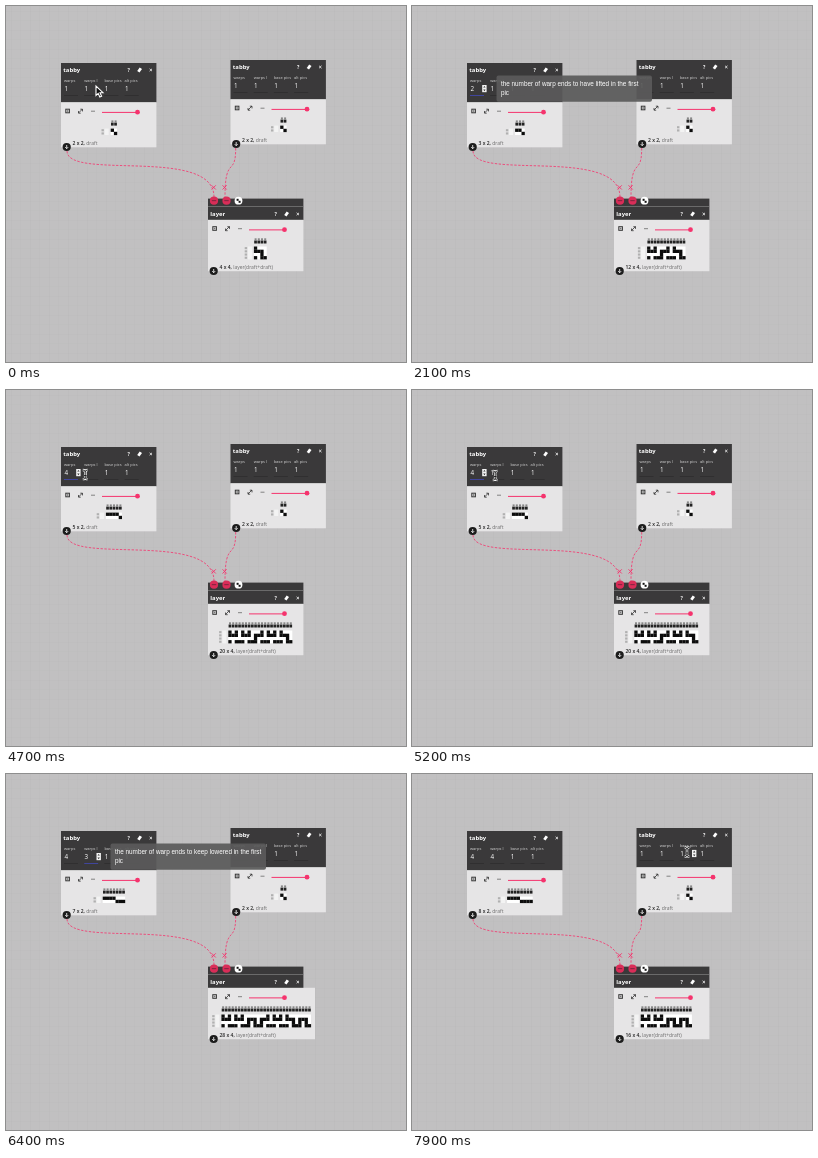
These frames come from a looping animation (400 px wide and 356 px high, 8 s). An HTML page with a canvas:

```html
<!DOCTYPE html>
<html lang="en">
<head>
<meta charset="utf-8">
<title>Draft editor</title>
<style>
  html, body { margin: 0; width: 100%; height: 100%; overflow: hidden; background: #c1c0c1; }
  canvas { display: block; }
</style>
</head>
<body>
<canvas id="stage" width="400" height="356"></canvas>
<script>
const ctx = document.getElementById('stage').getContext('2d');
const LOOP = 8000, CELL = 3.2;
const DARK = '#3a393a', LIGHT = '#e6e5e6', PINK = '#f5336d', INK = '#222', FOCUS = '#40459c';
const SANS = '"Open Sans", sans-serif';

// [time, lifted warps, lowered warps]
const settings = [[0, 1, 1], [1850, 2, 1], [2650, 3, 1], [2850, 4, 1], [5950, 4, 2], [6300, 4, 3], [6650, 4, 4]];
// [time, x, y] of the pointer's hot spot
const path = [[0, 90, 80], [100, 90, 80], [400, 58, 82], [600, 62.5, 83], [1300, 62.5, 83], [3600, 68.6, 82],
  [4000, 72, 83], [4500, 77, 84], [5000, 83.2, 85.7], [5300, 83.2, 85.5], [5600, 83, 83.5], [6650, 84, 84],
  [7000, 337, 72], [7250, 337, 72], [7650, 275, 78], [8000, 275, 78]];
const clicks = [[950, 62.5, 82.5], [5450, 83, 83.5], [7000, 337, 72]];
const tooltips = [
  [1800, 4550, 84.5, 'the number of warp ends to have lifted in the first'],
  [6250, 6850, 104.5, 'the number of warp ends to keep lowered in the first']
];

const clamp = v => Math.max(0, Math.min(1, v));
const between = (t, a, b) => t >= a && t < b;

function rect(x, y, w, h, color) {
  ctx.fillStyle = color;
  ctx.fillRect(x, y, w, h);
}

function disc(x, y, r, color) {
  ctx.fillStyle = color;
  ctx.beginPath();
  ctx.arc(x, y, r, 0, 7);
  ctx.fill();
}

function ring(x, y, r, color, width) {
  ctx.strokeStyle = color;
  ctx.lineWidth = width;
  ctx.beginPath();
  ctx.arc(x, y, r, 0, 7);
  ctx.stroke();
}

function stroke(d, color, width = 1, dash = []) {
  ctx.strokeStyle = color;
  ctx.lineWidth = width;
  ctx.setLineDash(dash);
  ctx.stroke(new Path2D(d));
  ctx.setLineDash([]);
}

function text(str, x, y, font, color) {
  ctx.font = font;
  ctx.fillStyle = color;
  ctx.fillText(str, x, y);
  return ctx.measureText(str).width;
}

function cross(x, y, r, color, width) {
  stroke(`M${x - r} ${y - r}l${2 * r} ${2 * r}M${x + r} ${y - r}l${-2 * r} ${2 * r}`, color, width);
}

// Weave structures: true means the warp is lifted
const tabby = (a, b) => ({ cols: a + b, rows: 2, at: (r, c) => (r === 0) === (c % (a + b) < a) });

function layer(top, bottom) {
  const cols = top.cols % 2 ? top.cols * 4 : top.cols * 2;
  return {
    cols, rows: 4,
    at: (r, c) => {
      const pick = r >> 1, warp = c >> 1;
      if (c % 2 === 0) return r % 2 === 1 || top.at(pick, warp % top.cols);
      return r % 2 === 1 && bottom.at(pick, warp % bottom.cols);
    }
  };
}

function drawDraft(draft, left, top) {
  const width = draft.cols * CELL, height = draft.rows * CELL;
  rect(left, top, width, height, '#fff');
  rect(left - 6, top, 4, height, '#f3f3f3');
  for (let c = 0; c < draft.cols; c++) {
    const x = left + c * CELL;
    rect(x + .7, top - 8.2, 2, 1.8, '#888');
    rect(x + .3, top - 6, 2.7, 3, '#222');
  }
  for (let r = 0; r < draft.rows; r++) {
    const y = top + r * CELL;
    rect(left - 9.2, y + .6, 2.4, 2.1, '#b0b0b0');
    for (let c = 0; c < draft.cols; c++) {
      if (draft.at(r, c)) rect(left + c * CELL, y, CELL + .1, CELL + .1, '#0c0c0c');
    }
  }
}

function titleBar(x, y, name) {
  text(name, x + 2.3, y + 9, `bold 5.9px ${SANS}`, '#fff');
  text('?', x + 66.6, y + 9, `bold 5px ${SANS}`, '#fff');
  ctx.save();
  ctx.translate(x + 78.6, y + 7);
  ctx.rotate(.6);
  rect(-1.4, -2.2, 2.8, 4.4, '#fff');
  ctx.restore();
  cross(x + 89.8, y + 7, 1.2, '#fff', .8);
}

function toolRow(x, y) {
  ctx.strokeStyle = '#333';
  ctx.lineWidth = 1;
  ctx.strokeRect(x + 4.8, y - 1.8, 3.6, 3.6);
  rect(x + 5.8, y - .8, 1.6, 1.6, '#777');
  stroke(`M${x + 17.5} ${y + 2}l4 -4m-2.2 .2h2.2v2.2m-4 -.4v2.2h2.2`, '#333', .8);
  stroke(`M${x + 30} ${y + .2}h4`, '#777', .9);
  stroke(`M${x + 41} ${y + 1.4}h35`, PINK, 1);
  disc(x + 76.5, y + 1.2, 2.4, PINK);
}

function outlet(x, y, draft, formula) {
  disc(x + 5.7, y, 4.1, '#1d1d1d');
  stroke(`M${x + 5.7} ${y - 2}v3.6m-1.5 -1.5l1.5 1.6l1.5 -1.6`, '#fff', .8);
  const w = text(`${draft.cols} x ${draft.rows}, `, x + 11.5, y - 1.8, `600 5px ${SANS}`, INK);
  text(formula, x + 11.5 + w, y - 1.8, `5px ${SANS}`, '#6b6b6b');
}

function tabbyPanel(x, y, values, draft) {
  rect(x, y, 95.4, 39.3, DARK);
  rect(x, y + 39.3, 95.4, 45, LIGHT);
  titleBar(x, y, 'tabby');
  ['warps', 'warps l', 'base pics', 'alt pics'].forEach((label, i) => {
    const fx = x + 3 + i * 20.2;
    text(label, fx, y + 19.4, `4px ${SANS}`, '#d5d5d5');
    text(values[i], fx + .4, y + 28.3, `6.3px ${SANS}`, '#fff');
    rect(fx, y + 32, 14, 1, '#302f30');
  });
  toolRow(x, y + 48);
  drawDraft(draft, x + 52.9 - draft.cols * CELL / 2, y + 65.6);
  outlet(x, y + 84, draft, 'draft');
}

function layerPanel(draft) {
  const x = 202, y = 192, left = Math.max(215.4, 254.3 - draft.cols * CELL / 2);
  const width = Math.max(95.4, left + draft.cols * CELL + 4 - x);
  rect(x, y + .6, 95.4, 21.4, DARK);
  rect(x, y + 8, 95.4, .6, '#8a8a8a');
  rect(x, y + 21.8, width, 51.4, LIGHT);
  titleBar(x, y + 9, 'layer');
  toolRow(x, y + 30.5);
  drawDraft(draft, left, 240.5);
  outlet(x, y + 73, draft, 'layer(draft+draft)');
}

function wires() {
  stroke('M61 145C61 175 208 140 208 191', PINK, .8, [2.4, 1.5]);
  stroke('M229.7 142C229.7 172 219 148 219 191', PINK, .8, [2.4, 1.5]);
  for (const x of [207.7, 218.6]) cross(x, 181.4, 2.1, PINK, .9);
  for (const x of [208, 220.5]) {
    disc(x, 194.7, 4.1, '#d92d58');
    rect(x - 2.2, 194, 4.4, 1.2, '#8c2542');
  }
  disc(232.5, 194.7, 3.9, '#fff');
  rect(230.6, 192.8, 2, 2, '#111');
  rect(232.6, 194.8, 2, 2, '#111');
}

function spinner(x, y) {
  rect(x - 2.2, y - 3.6, 4.4, 7.2, '#f4f4f4');
  ctx.fillStyle = '#333';
  ctx.fill(new Path2D(`M${x - 1.2} ${y - 1}h2.4l-1.2 -1.7zM${x - 1.2} ${y + 1}h2.4l-1.2 1.7z`));
}

function fieldStates(t) {
  if (between(t, 350, 5500)) spinner(72.4, 82.6);
  if (between(t, 1000, 5500)) rect(58, 89, 14, 1, FOCUS);
  if (between(t, 5500, 7200)) {
    spinner(92.7, 82.6);
    rect(78.2, 89, 14, 1, FOCUS);
  }
  if (t >= 7550) spinner(282.2, 79.5);
}

function tooltip(t, [start, end, x, line]) {
  const alpha = Math.min(clamp((t - start) / 120), clamp((end - t) / 100));
  if (!alpha) return;
  ctx.globalAlpha = alpha;
  ctx.fillStyle = 'rgba(91,91,91,.92)';
  ctx.beginPath();
  ctx.roundRect(x, 69.4, 155.5, 26.4, 2);
  ctx.fill();
  const font = '6.37px "Liberation Sans", Arial, sans-serif';
  text(line, x + 4.4, 80.2, font, '#fff');
  text('pic', x + 4.4, 89.3, font, '#fff');
  ctx.globalAlpha = 1;
}

function pointer(t) {
  if (between(t, 1900, 3550) || between(t, 5900, 6600)) return;
  const i = path.findIndex((p, k) => t < path[k + 1][0]);
  const [t0, x0, y0] = path[i], [t1, x1, y1] = path[i + 1];
  const u = (t - t0) / (t1 - t0), k = u * u * (3 - 2 * u);
  const x = x0 + (x1 - x0) * k, y = y0 + (y1 - y0) * k;

  for (const [start, cx, cy] of clicks) {
    if (!between(t, start, start + 350)) continue;
    const r = 11 - 5 * clamp((t - start - 200) / 150);
    ring(cx, cy, r - .6, '#111', 1.8);
    ring(cx, cy, r - 1.9, '#ddd', .8);
  }
  const overField = between(t, 350, 6700) || t > 7550;
  if (overField) {
    const beam = `M${x - 2.4} ${y - 4.6}q2.4 0 2.4 1.8q0 -1.8 2.4 -1.8M${x} ${y - 3}v6` +
      `M${x - 2.4} ${y + 4.6}q2.4 0 2.4 -1.8q0 1.8 2.4 1.8M${x - 1.3} ${y + 1}h2.6`;
    stroke(beam, '#fff', 2.3);
    stroke(beam, '#111', .9);
  } else {
    const arrow = new Path2D(`M${x} ${y}v9.4l2.2 -2l1.6 3.6l1.8 -.8l-1.6 -3.5h3z`);
    ctx.fillStyle = '#111';
    ctx.strokeStyle = '#fff';
    ctx.lineWidth = 1.1;
    ctx.fill(arrow);
    ctx.stroke(arrow);
  }
}

function draw(t) {
  rect(0, 0, 400, 356, '#c1c0c1');
  for (let p = 5; p < 400; p += 9.5) {
    rect(p, 0, .6, 356, 'rgba(0,0,0,.02)');
    rect(0, p, 400, .6, 'rgba(0,0,0,.02)');
  }
  const [, lifted, lowered] = settings.findLast(s => t >= s[0]);
  const first = tabby(lifted, lowered), second = tabby(1, 1);
  tabbyPanel(55, 57, [lifted, lowered, 1, 1], first);
  tabbyPanel(224.5, 54, [1, 1, 1, 1], second);
  layerPanel(layer(first, second));
  wires();
  fieldStates(t);
  tooltips.forEach(tip => tooltip(t, tip));
  pointer(t);
}

function tick() {
  draw(performance.now() % LOOP);
  requestAnimationFrame(tick);
}
tick();
</script>
</body>
</html>
```
